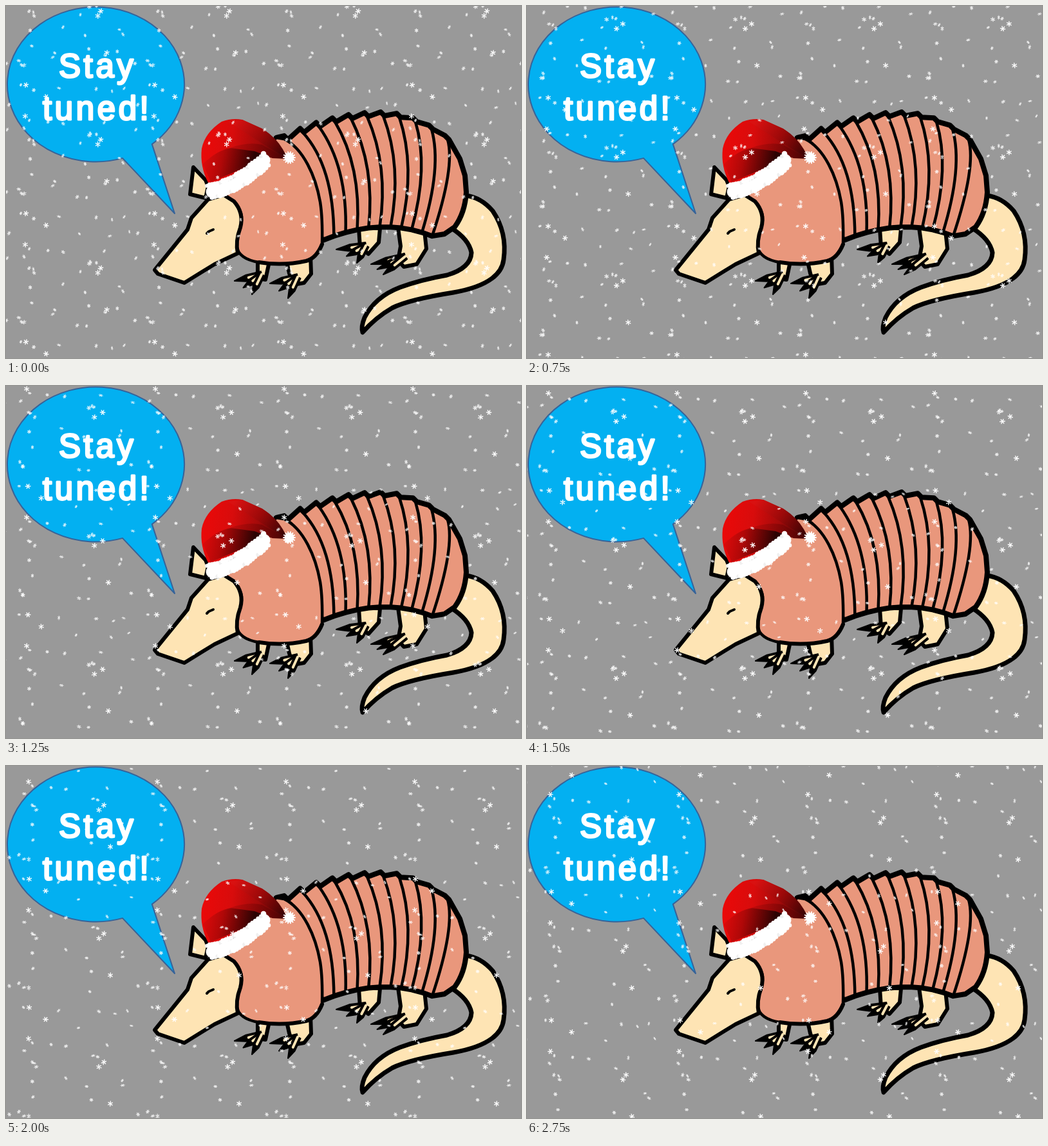
Animation, 800 px wide and 548 px high, one loop 3 s. Source, as an HTML page with a canvas:

```html
<!DOCTYPE html>
<html lang="en">
<head>
<meta charset="utf-8">
<title>Stay tuned!</title>
<style>
html, body { margin: 0; width: 100%; height: 100%; overflow: hidden; background: #999; }
canvas { display: block; }
</style>
</head>
<body>
<canvas id="stage" width="800" height="548"></canvas>
<script>
const W = 800, H = 548, LOOP = 3000, STEP = 250, TILE = 200;
const SKIN = '#fee4b4', SHELL = '#e9977c', INK = '#000';

function layer(w, h) {
  const c = document.createElement('canvas');
  c.width = w;
  c.height = h;
  return c;
}

const art = layer(W, H);
const g = art.getContext('2d');
g.lineJoin = g.lineCap = 'round';

function shape(d, fill, stroke, width) {
  const p = new Path2D(d);
  if (fill) { g.fillStyle = fill; g.fill(p); }
  if (stroke) { g.strokeStyle = stroke; g.lineWidth = width; g.stroke(p); }
}

function gradient(x0, y0, x1, y1, ...colors) {
  const grad = g.createLinearGradient(x0, y0, x1, y1);
  colors.forEach((c, i) => grad.addColorStop(i / (colors.length - 1), c));
  return grad;
}

function drawTail() {
  shape('M692 346 L714 295 Q738 298 756 319 Q779 353 773 395 Q771 412 755 424 ' +
    'Q735 439 695 446 Q626 457 600 470 Q574 485 554 508 Q551 500 557 485 ' +
    'Q573 453 612 438 Q645 426 685 419 Q722 408 723 384 Q719 363 692 346 Z', SKIN, INK, 7);
}

// Three tapering toes fanned between two outer tips.
function drawFoot(x, y, ax, ay, bx, by) {
  for (let k = 0; k < 3; k++) {
    const dx = ax + (bx - ax) * k / 2 - x, dy = ay + (by - ay) * k / 2 - y;
    const len = Math.hypot(dx, dy), nx = -dy / len * 5, ny = dx / len * 5;
    shape(`M${x + nx} ${y + ny} L${x + dx * 0.55 + nx} ${y + dy * 0.55 + ny} ` +
      `L${x + dx} ${y + dy} L${x + dx * 0.6 - nx} ${y + dy * 0.6 - ny} ` +
      `L${x - nx} ${y - ny} Z`, INK, INK, 2);
    shape(`M${x} ${y} L${x + dx * 0.48} ${y + dy * 0.48}`, null, SKIN, 4);
  }
}

function drawLegs() {
  shape('M548 346 L581 346 L579 368 L563 386 L550 376 Z', SKIN, INK, 6);
  drawFoot(559, 373, 513, 379, 545, 400);
  shape('M609 345 L613 374 L609 396 L618 406 L638 402 L653 378 L650 350 Z', SKIN, INK, 6);
  drawFoot(620, 390, 567, 402, 586, 418);
  shape('M391 397 L391 413 L389 424 L403 426 L409 398 Z', SKIN, INK, 6);
  drawFoot(397, 418, 355, 428, 382, 449);
  shape('M436 398 L440 416 L446 434 L463 431 L474 417 L473 388 Z', SKIN, INK, 6);
  drawFoot(453, 422, 410, 432, 438, 455);
}

// Dividing ring i, from the back (x, y) to the belly (fx, fy).
function ring(i) {
  return {
    x: 436 + 25 * i,
    y: 171 + (i < 6 ? 1.03 : 2.3) * (i - 6) ** 2,
    fx: 491 + 17.1 * i + 4 * Math.sin(Math.PI * i / 10),
    fy: 344 + 0.7 * (i - 5.5) ** 2
  };
}

function drawShell() {
  const rings = Array.from({ length: 11 }, (_, i) => ring(i));
  const back = rings.map(r => `L${r.x - 4} ${r.y - 6} L${r.x + 2} ${r.y}`).join(' ');
  const belly = rings.slice().reverse().map(r => `L${r.fx} ${r.fy}`).join(' ');
  shape(`M420 205 ${back} L705 238 L713 264 L715 290 Q713 322 697 344 L681 355 ` +
    `${belly} L470 300 Z`, SHELL, INK, 8);
  for (const r of rings)
    shape(`M${r.x} ${r.y} Q${(r.x + r.fx) / 2 + 24} 250 ${r.fx} ${r.fy}`, null, INK, 4.5);

  shape('M330 298 L420 205 L432 207 C462 222 481 265 488 305 Q492 330 491 370 ' +
    'Q482 392 466 397 Q430 405 393 399 Q361 394 358 373 Q358 358 364 344 ' +
    'Q372 320 350 302 Z', SHELL, INK, 4.5);
  shape('M491 371 Q482 393 466 397 Q430 405 393 399', null, INK, 6);
}

function drawHead() {
  shape('M291 251 L310 271 L314 281 L310 299 L286 293 Z', SKIN, INK, 6);
  shape('M314 301 L288 330 L282 348 L231 411 L236 417 L277 431 L306 413 L324 402 ' +
    'L360 385 Q356 366 364 345 Q370 322 354 304 L338 294 Z', SKIN, INK, 6);
  shape('M312 354 L315 351 L322 348', null, INK, 4);
}

function drawHat() {
  shape('M314 275 Q301 250 304 222 Q309 197 335 180 Q351 174 367 177 L398 191 ' +
    'Q419 204 430 223 L438 238 L414 237 L390 229 L374 250 L340 273 Z',
    gradient(308, 215, 432, 230, '#e90909', '#d80c0c', '#a30a0a', '#420505'));
  shape('M345 180 L367 177 L398 191 Q420 205 437 237 L398 214 Z',
    gradient(355, 180, 432, 230, '#d91111', '#9c0909', '#3c0404'));
  shape('M306 246 Q328 224 350 221 Q373 219 400 229 L375 250 L318 274 Z',
    gradient(312, 232, 384, 246, '#d60a0a', '#b00808', '#6e0505', '#2b0303'));
  shape('M348 221 Q375 211 398 216 L432 236 L412 236 L386 226 Z',
    gradient(350, 220, 430, 236, '#c00b0b', '#880707', '#4a0404'));

  shape('M320 289 Q352 286 376 263 L401 240', null, '#fff', 19);
  for (let i = 0; i < 44; i++) {
    const k = (i >> 1) / 21, side = i % 2 ? 1 : -1;
    const x = 316 + 88 * k, y = 289 - 16 * k - 34 * k * k;
    const r = 3 + (i * 7 % 5) / 3;
    shape(`M${x + side * 4} ${y + side * 9} h.01`, null, i % 5 ? '#fff' : '#f0f0f0', r * 2);
  }
  for (let i = 0; i < 14; i++) {
    const a = i * Math.PI / 7;
    shape(`M440 236 l${9 * Math.cos(a)} ${9 * Math.sin(a)}`, null, '#fff', 2);
  }
  shape('M440 236 h.01', null, '#fff', 15);
}

function drawBubble() {
  g.beginPath();
  g.ellipse(139.5, 122, 137.5, 120.5, 0, 1.264, 0.883 + Math.PI * 2);
  g.lineTo(262, 323);
  g.closePath();
  g.fillStyle = '#03b0f1';
  g.fill();
  g.strokeStyle = '#376399';
  g.lineWidth = 2;
  g.stroke();

  g.font = '51px "Liberation Sans", Arial, sans-serif';
  g.letterSpacing = '4.6px';
  g.fillStyle = g.strokeStyle = '#fff';
  g.lineWidth = 3;
  for (const [text, x, y] of [['Stay', 82, 111], ['tuned!', 57, 177]]) {
    g.fillText(text, x, y);
    g.strokeText(text, x, y);
  }
}

function drawScene() {
  g.fillStyle = '#999';
  g.fillRect(0, 0, W, H);
  drawTail();
  drawLegs();
  drawShell();
  drawHead();
  drawHat();
  drawBubble();
}

function randomizer(seed) {
  return () => {
    seed = (seed * 1664525 + 1013904223) % 4294967296;
    return seed / 4294967296;
  };
}

// A snow tile that thins out while it falls, then starts afresh.
const FLAKES = 46, LARGE = 6, FALL = 0.0265, DRIFT = 0.0025;
const rand = randomizer(2024);
const flakes = Array.from({ length: FLAKES }, (_, i) => ({
  x: rand() * TILE,
  y: rand() * TILE,
  sway: rand() * 6,
  r: i < LARGE ? 3.8 : 2 + rand() * 1.2,
  squash: i < LARGE ? 0.95 : 0.45 + rand() * 0.5,
  turn: rand() * Math.PI,
  alpha: i < LARGE ? 0.95 : 0.8
}));
Object.assign(flakes[0], { x: 31, y: 123, sway: 0 });
Object.assign(flakes[1], { x: 147, y: 8, sway: 0 });

const tile = layer(TILE, TILE);
const s = tile.getContext('2d');
s.lineCap = 'round';
s.strokeStyle = '#fff';
s.lineWidth = 1.5;

function drawFlake(f, x, y, turn) {
  s.save();
  s.translate(x, y);
  s.rotate(turn);
  s.scale(1, f.squash);
  s.globalAlpha = f.alpha;
  s.beginPath();
  for (let k = 0; k < 3; k++) {
    const dx = f.r * Math.cos(k * Math.PI / 3), dy = f.r * Math.sin(k * Math.PI / 3);
    s.moveTo(-dx, -dy);
    s.lineTo(dx, dy);
  }
  s.stroke();
  s.restore();
}

function drawSnow(t) {
  s.clearRect(0, 0, TILE, TILE);
  const count = Math.round(FLAKES - 16 * t / LOOP);
  for (const f of flakes.slice(0, count)) {
    const x = (f.x + t * DRIFT + f.sway * Math.sin(t / 400 + f.turn) + TILE) % TILE;
    const y = (f.y + t * FALL) % TILE;
    // Repeat across the edges so that the tile stays seamless.
    for (const ox of [-TILE, 0, TILE])
      for (const oy of [-TILE, 0, TILE])
        drawFlake(f, x + ox, y + oy, f.turn + t * 0.001);
  }
}

const ctx = document.getElementById('stage').getContext('2d');
let shown = -1;

function render(now) {
  const t = Math.floor(now % LOOP / STEP) * STEP;
  if (t === shown) return;
  shown = t;
  drawSnow(t);
  ctx.drawImage(art, 0, 0);
  for (let y = 0; y < H; y += TILE)
    for (let x = 0; x < W; x += TILE) ctx.drawImage(tile, x, y);
}

drawScene();
let start = null;
function tick(now) {
  if (start === null) start = now;
  render(now - start);
  requestAnimationFrame(tick);
}
render(0);
requestAnimationFrame(tick);
</script>
</body>
</html>
```
